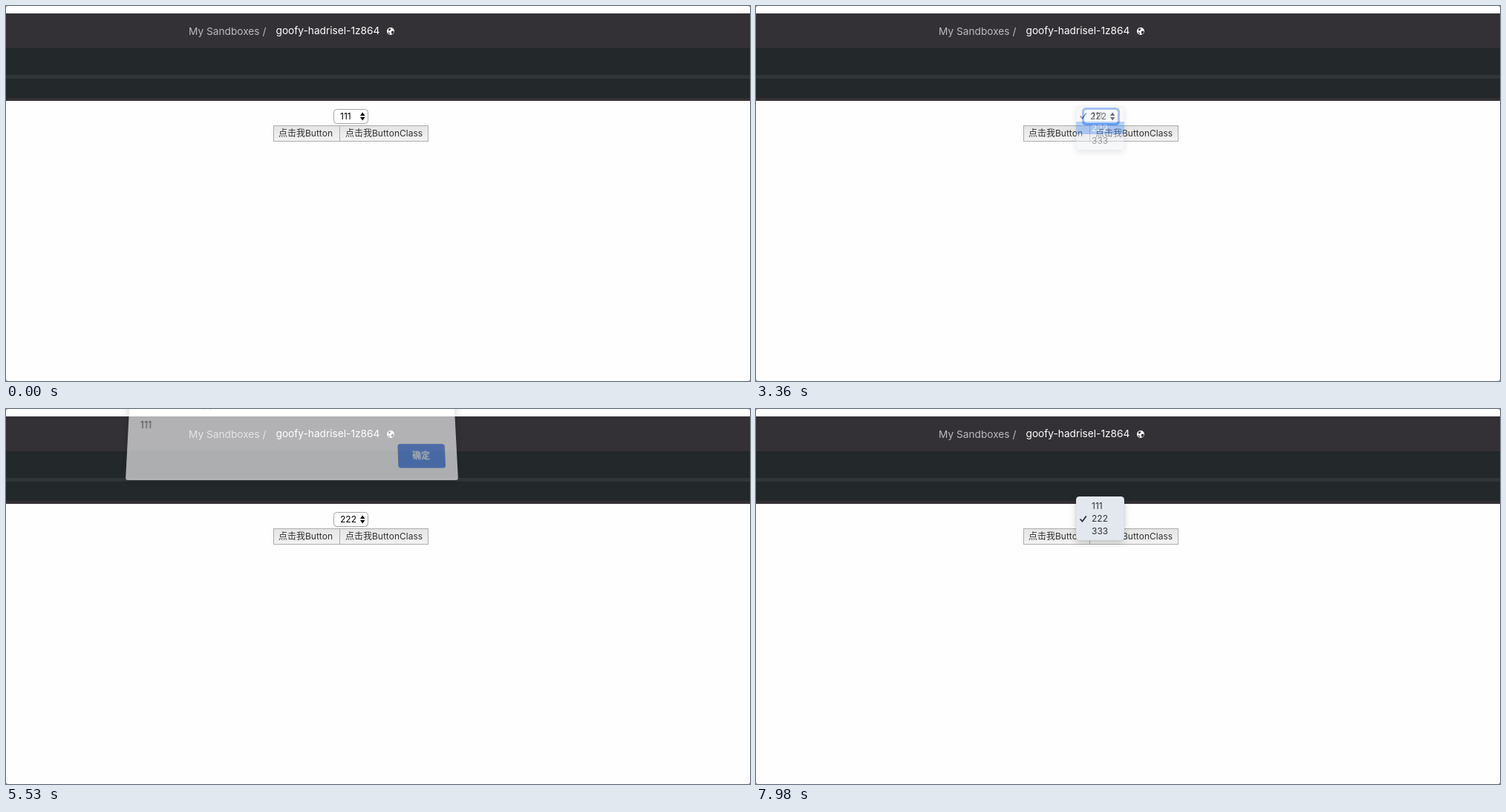
These frames come from a looping animation (1002 by 506 pixels, 8000 ms). An HTML page:

```html
<!DOCTYPE html>
<html lang="zh">
<head>
<meta charset="utf-8">
<title>Select and alert</title>
<style>
  html, body { margin: 0; width: 100%; height: 100%; overflow: hidden; background: #8a8a8a; }
  body, svg text { font-family: Inter, "Noto Sans CJK SC", "Noto Sans CJK", sans-serif; }
  #stage { position: relative; width: 1002px; height: 506px; overflow: hidden; border-radius: 3px; background: #fefefe; }
  #page { position: absolute; inset: 0; display: block; }
  #menu { filter: drop-shadow(0 3px 4px rgba(0, 0, 0, .2)); }
  #dialog {
    position: absolute; left: 161px; top: -40px; width: 448px; height: 144px;
    background: #fff; border-radius: 3px; box-shadow: 0 2px 12px rgba(0, 0, 0, .3);
    transform-origin: 50% 100%;
  }
  #dialog svg { display: block; }
</style>
</head>
<body>
<div id="stage">
  <svg id="page" width="1002" height="506" viewBox="0 0 1002 506">
    <defs>
      <linearGradient id="face" x2="0" y2="1">
        <stop stop-color="#e4e4e4"/>
        <stop offset="1" stop-color="#f3f3f3"/>
      </linearGradient>
    </defs>

    <rect y="10" width="1002" height="118" fill="#333135"/>
    <rect y="57" width="1002" height="67" fill="#23282b"/>
    <rect y="93" width="1002" height="5" fill="#303538"/>
    <g font-size="13.7">
      <text x="246" y="39" fill="#bbbabc">My Sandboxes /</text>
      <text x="363.5" y="38" fill="#fff">goofy-hadrisel-1z864</text>
    </g>
    <circle cx="518" cy="34" r="5" fill="#fff"/>
    <path d="M515 31l2.5-1 1 1.5-1.5 1.5-1.5 1zM519 34l3-.5 .5 2-2 2.5-1.5-1zM514.5 35l2 1 .5 2-1.5-.5z" fill="#333135"/>

    <g stroke="#adadad" fill="url(#face)">
      <rect x="360.5" y="161.5" width="89" height="21"/>
      <rect x="449.5" y="161.5" width="119" height="21"/>
    </g>
    <g font-size="12" fill="#333">
      <text x="367" y="176">点击我Button</text>
      <text x="457" y="176">点击我ButtonClass</text>
    </g>

    <rect id="ring" x="440.5" y="138.5" width="48" height="21" rx="4" fill="none" stroke="#6799f0" stroke-width="3"/>
    <rect id="box" x="441.5" y="139.5" width="46" height="19" rx="4" fill="#fff" stroke="#a6a6a6"/>
    <text id="value" x="450" y="153" font-size="12"></text>
    <path d="M477 148l3.2-4.5 3.2 4.5zM477 150l3.2 4.5 3.2-4.5z"/>

    <g id="menu">
      <rect id="sheet" x="431" width="65" height="59.5" rx="4.5" stroke="#000" stroke-opacity=".12" stroke-width=".5"/>
      <rect id="bar" x="431" width="65" height="17" fill="#5d9af8"/>
      <path id="tick" d="M436.5 9.5l3 3.2 5.3-7.2" fill="none" stroke-width="1.8"/>
      <g id="items" font-size="12"></g>
    </g>
  </svg>

  <div id="dialog">
    <svg width="448" height="144" viewBox="161 -40 448 144">
      <text x="177" y="6" font-size="15" fill="#202124">1z864.csb.app 上的嵌入式页面显示</text>
      <text x="177" y="35" font-size="13" fill="#606468">111</text>
      <rect id="ok" x="529" y="56" width="64" height="32" rx="3.5"/>
      <text x="560.5" y="76.5" font-size="12" font-weight="700" fill="#fff" text-anchor="middle">确定</text>
    </svg>
  </div>
</div>

<script>
const LOOP = 8000, STEP = 70, ROW = 17;
const OPTIONS = ['111', '222', '333'];
const $ = id => document.getElementById(id);
const set = (id, attrs) => {
  for (const name in attrs) $(id).setAttribute(name, attrs[name]);
};
const show = (id, on) => set(id, { visibility: on ? 'visible' : 'hidden' });

const items = OPTIONS.map(label => {
  const text = document.createElementNS('http://www.w3.org/2000/svg', 'text');
  text.textContent = label;
  text.setAttribute('x', 452);
  $('items').append(text);
  return text;
});

// Value of the last [time, value] pair already reached.
const at = (track, t) => track.reduce((value, [time, next]) => t >= time ? next : value, 0);

const menuAlpha = [[2310, 1], [3290, .75], [3360, .45], [3430, .18], [3500, 0], [7070, 1]];
const dialogAlpha = [
  [3710, .08], [3780, .3], [3850, .57], [3920, .81], [3990, .95], [4060, 1],
  [5530, .62], [5600, .28], [5670, .08], [5740, 0]
];
// Row under the pointer; -1 is the blink after a choice.
const hover = [[2800, 1], [3010, -1], [3080, 1], [7700, 0], [7980, -1]];

function drawMenu(t) {
  const checked = t < 5000 ? 0 : 1;
  const hot = at(hover, t);
  const top = 139 - ROW * checked;
  const rowY = i => top + ROW * i;
  set('menu', { opacity: at(menuAlpha, t) });
  set('sheet', { y: top - 4, fill: checked ? '#e3e7ee' : '#eff1f5' });
  set('bar', { y: rowY(hot), opacity: hot < 0 ? 0 : 1 });
  set('tick', {
    transform: `translate(0 ${rowY(checked)})`,
    stroke: hot === checked ? '#fff' : '#2c2e33'
  });
  items.forEach((text, i) => {
    text.setAttribute('y', rowY(i) + 13);
    text.setAttribute('fill', i === hot ? '#fff' : '#303236');
  });
}

function drawDialog(t) {
  const alpha = at(dialogAlpha, t);
  const tilt = (1 - alpha) / .38;
  const lift = -8 * tilt ** .7;
  const keystone = .00024 * tilt ** .8;
  const style = $('dialog').style;
  style.opacity = alpha;
  style.transform = tilt
    ? `translateY(${lift}px) matrix3d(1,0,0,0, 0,${1 + .03 * tilt},0,${-keystone}, 0,0,1,0, 0,0,0,1)`
    : 'none';
  set('ok', { fill: t >= 5390 ? '#5c90ec' : '#6294ee' });
}

function draw(ms) {
  const t = Math.floor(ms % LOOP / STEP) * STEP;
  $('value').textContent = OPTIONS[t < 3290 ? 0 : 1];
  show('ring', t >= 3290 && t < 5530);
  set('box', { stroke: t >= 3290 && t < 5530 ? '#6799f0' : '#a6a6a6' });
  drawMenu(t);
  drawDialog(t);
}

const start = performance.now();
function tick() {
  draw(performance.now() - start);
  requestAnimationFrame(tick);
}
tick();
</script>
</body>
</html>
```
